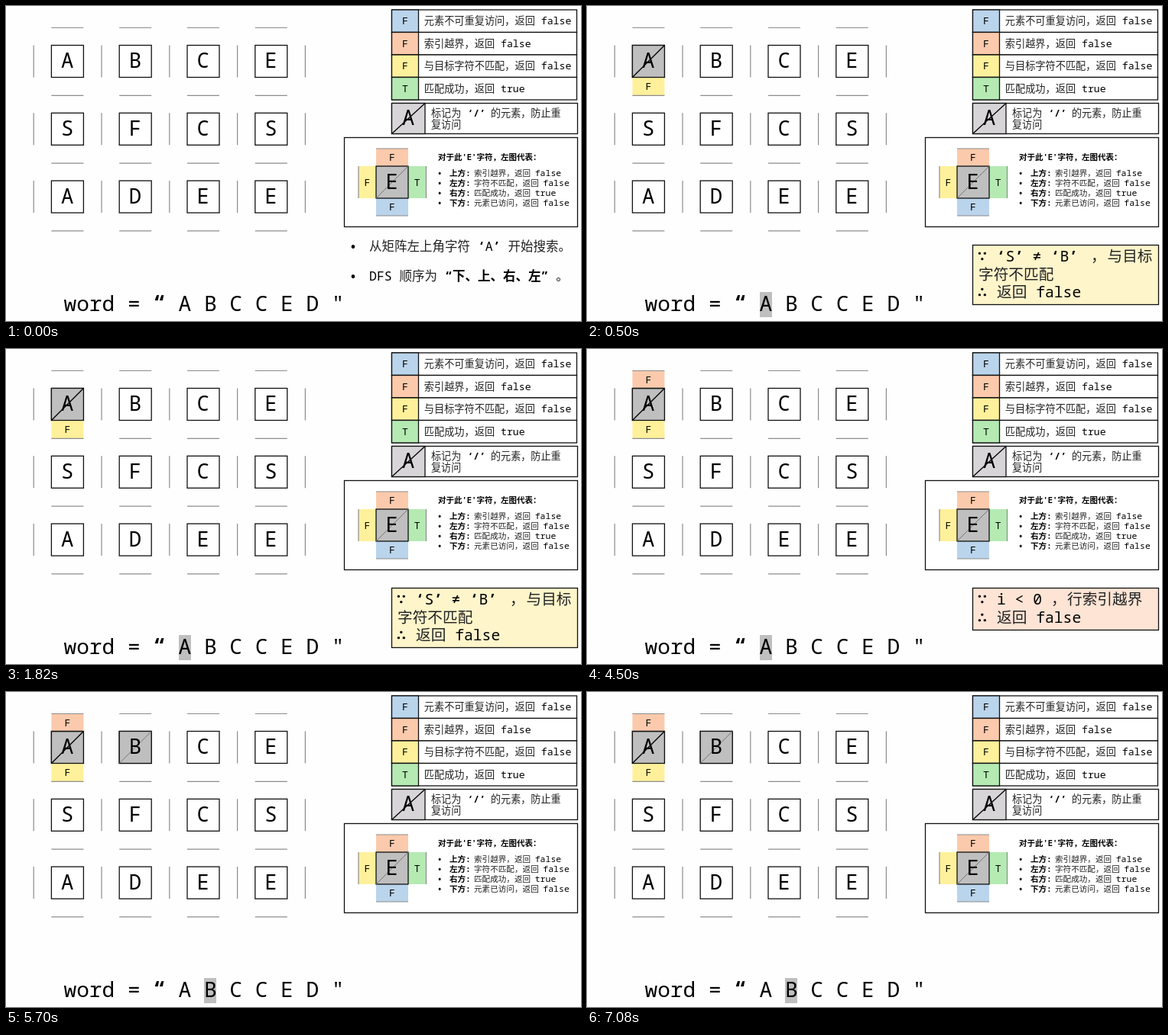
Recreate the animation shown at these times as an HTML page. Size 752 px wide and 413 px high, loop 8000 ms.

```html
<!DOCTYPE html>
<html lang="zh-CN">
<head>
<meta charset="utf-8">
<title>DFS word search</title>
<style>
html, body { margin: 0; width: 100%; height: 100%; overflow: hidden; background: #fefefe; }
svg { display: block; width: 100%; height: 100%; }
text { font-family: "Noto Sans Mono", "Noto Sans CJK SC", "Noto Sans CJK", monospace; fill: #000; white-space: pre; }
.mid { text-anchor: middle; }
.han { font-weight: 300; fill: #222; }
.bold, .bold .han { font-weight: 700; fill: #000; }
.box { stroke: #111; stroke-width: 1.3; }
.edge { stroke: #8c8c8c; stroke-width: 1.2; }
.slash { stroke: #000; stroke-width: 1.3; }
.thin { stroke: #777; stroke-width: 1; }

.intro, .match, .bounds, .first, .above, .second, .wordA { animation: 8s step-end infinite; }
.intro { animation-name: intro; }
.match { animation-name: match; }
.bounds { animation-name: bounds; }
.first { animation-name: first; }
.above { animation-name: above; }
.second { animation-name: second; }
.wordA { animation-name: wordA; }
@keyframes intro { 0% { opacity: 1 } 6.25%, to { opacity: 0 } }
@keyframes match { 0% { opacity: 0 } 6.25% { opacity: 1 } 33.75%, to { opacity: 0 } }
@keyframes bounds { 0% { opacity: 0 } 33.75% { opacity: 1 } 71.25%, to { opacity: 0 } }
@keyframes first { 0% { opacity: 0 } 6.25%, to { opacity: 1 } }
@keyframes above { 0% { opacity: 0 } 33.75%, to { opacity: 1 } }
@keyframes second { 0% { opacity: 0 } 71.25%, to { opacity: 1 } }
@keyframes wordA { 0% { opacity: 0 } 6.25% { opacity: 1 } 71.25%, to { opacity: 0 } }
</style>
</head>
<body>
<svg id="stage" viewBox="0 0 752 413" preserveAspectRatio="none"></svg>
<script>
const BLUE = '#bad4ec', ORANGE = '#fbcaac', YELLOW = '#fff19b', GREEN = '#b5eab3', GREY = '#bfbfbf';
const PITCH = 88.8, CELL = 42, X0 = 59.4, Y0 = 51.5;

const rect = (x, y, w, h, fill, cls = '') =>
  `<rect x="${x}" y="${y}" width="${w}" height="${h}" fill="${fill}" class="${cls}"/>`;
const line = (x1, y1, x2, y2, cls) =>
  `<line x1="${x1}" y1="${y1}" x2="${x2}" y2="${y2}" class="${cls}"/>`;
const span = (cls, str) => `<tspan class="${cls}">${str}</tspan>`;
const bold = str => span('bold', str);
// Chinese runs are light, curly quotes and signs heavy.
const weigh = str => str
  .replace(/[\u3001-\u9fff\uff00-\uffef]+/g, s => span('han', s))
  .replace(/[‘’“”•∵∴]/g, bold);
const text = (x, y, size, str, cls = '') =>
  `<text x="${x}" y="${y}" font-size="${size}" class="${cls}">${weigh(str)}</text>`;
const group = (cls, ...parts) => `<g class="${cls}">${parts.join('')}</g>`;
// Several pieces on one baseline: [x, string] pairs.
const row = (y, size, ...pieces) => pieces.map(([x, s]) => text(x, y, size, s)).join('');
const tag = (x, y, w, h, fill, letter) =>
  rect(x, y, w, h, fill) + text(x + w / 2, y + h / 2 + 4.5, 13, letter, 'mid');

function cell(x, y, letter, fill, slash) {
  return rect(x, y, CELL, CELL, fill, 'box') +
    (slash ? line(x, y + CELL, x + CELL, y, slash) : '') +
    text(x + CELL / 2 - 0.3, y + 29.7, 27.2, letter, 'mid');
}

function board() {
  let out = '';
  ['ABCE', 'SFCS', 'ADEE'].forEach((letters, r) => {
    const y = Y0 + r * PITCH;
    [...letters].forEach((ch, c) => out += cell(X0 + c * PITCH, y, ch, '#fff'));
    for (let c = 0; c < 5; c++) {
      const x = 36.2 + c * PITCH;
      out += line(x, y, x, y + CELL, 'edge');
    }
  });
  return out;
}

function boardEdges() {
  let out = '';
  for (let r = 0; r < 4; r++)
    for (let c = 0; c < 4; c++) {
      const x = X0 + c * PITCH, y = 28.5 + r * PITCH;
      out += line(x, y, x + CELL, y, 'edge');
    }
  return out;
}

function legend() {
  const rows = [
    [BLUE, 'F', '元素不可重复访问，返回 false'],
    [ORANGE, 'F', '索引越界，返回 false'],
    [YELLOW, 'F', '与目标字符不匹配，返回 false'],
    [GREEN, 'T', '匹配成功，返回 true']
  ];
  let out = '';
  rows.forEach(([fill, ch, label], i) => {
    const y = 5 + i * 29.5;
    out += rect(504.5, y, 242, 29.5, '#fff', 'box') + rect(504.5, y, 35, 29.5, fill, 'box') +
      text(522, y + 19.3, 13.2, ch, 'mid') + text(546.8, y + 19.3, 13.2, label);
  });
  return out +
    rect(504.5, 127.5, 243, 40, '#fff', 'box') + rect(504.5, 127.5, 43.5, 40, '#d8d5d8', 'box') +
    line(504.5, 167.5, 548, 127.5, 'slash') + text(526, 156, 27, 'A', 'mid') +
    row(144.5, 13.1, [556, '标记为'], [603.5, bold('‘/’')], [634, '的元素，防止重']) +
    text(556, 160, 13.1, '复访问');
}

function sample() {
  const notes = [
    ['上方', '索引越界，返回', 'false'],
    ['左方', '字符不匹配，返回', 'false'],
    ['右方', '匹配成功，返回', 'true'],
    ['下方', '元素已访问，返回', 'false']
  ];
  let out = rect(442.5, 172.5, 305, 117, '#fff', 'box') +
    tag(484, 187, 42, 23, ORANGE, 'F') + tag(461, 210, 23, 42, YELLOW, 'F') +
    tag(526, 210, 23.5, 42, GREEN, 'T') + tag(484, 252, 42, 23, BLUE, 'F') +
    line(484, 187, 526, 187, 'edge') + line(484, 275, 526, 275, 'edge') +
    line(461, 210, 461, 252, 'edge') + line(549.5, 210, 549.5, 252, 'edge') +
    cell(484, 210, 'E', GREY, 'thin') +
    text(565, 202, 10.5, "对于此'E'字符，左图代表：", 'bold');
  notes.forEach(([side, why, value], i) => {
    const y = 222.7 + i * 13, end = 612 + why.length * 10.6;
    out += row(y, 10.6, [564, '•'], [580, bold(side + ':')], [612, why]) +
      text(end + 5.5, y + 0.4, 11.5, value);
  });
  return out;
}

const intro = group('intro',
  row(321, 16.5, [449, '•'], [475, '从矩阵左上角字符 ‘A’ 开始搜索。']),
  row(360, 16.5, [449, '•'], [475, `DFS 顺序为 ${bold('“下、上、右、左”')} 。`]));

const match = group('match',
  rect(504.5, 313.5, 243, 78, '#fff5cb', 'box'),
  row(334.5, 19.7, [511, '∵'], [535.6, '‘S’ ≠'], [606.6, '‘B’'], [659, '，'], [680.5, '与目标']),
  text(512, 358.5, 19.7, '字符不匹配'),
  row(382, 19.7, [511, '∴'], [536, '返回 false']));

const bounds = group('bounds',
  rect(504.5, 313.5, 243, 55, '#fde4d5', 'box'),
  row(335, 19.7, [511, '∵'], [536, 'i &lt; 0'], [607, '，'], [628, '行索引越界']),
  row(358.5, 19.7, [511, '∴'], [536, '返回 false']));

document.getElementById('stage').innerHTML =
  board() +
  group('first', tag(X0, 94, CELL, 23.5, YELLOW, 'F'), cell(X0, Y0, 'A', GREY, 'slash')) +
  group('above', tag(X0, 28.5, CELL, 23, ORANGE, 'F'), line(X0, Y0, X0 + CELL, Y0, 'box')) +
  group('second', cell(X0 + PITCH, Y0, 'B', GREY, 'thin')) +
  boardEdges() + legend() + sample() + intro + match + bounds +
  rect(226, 375, 16, 33, GREY, 'wordA') + rect(259, 375, 16, 33, GREY, 'second') +
  text(75.5, 400, 27.8, 'word = “ A B C C E D "');
</script>
</body>
</html>
```
